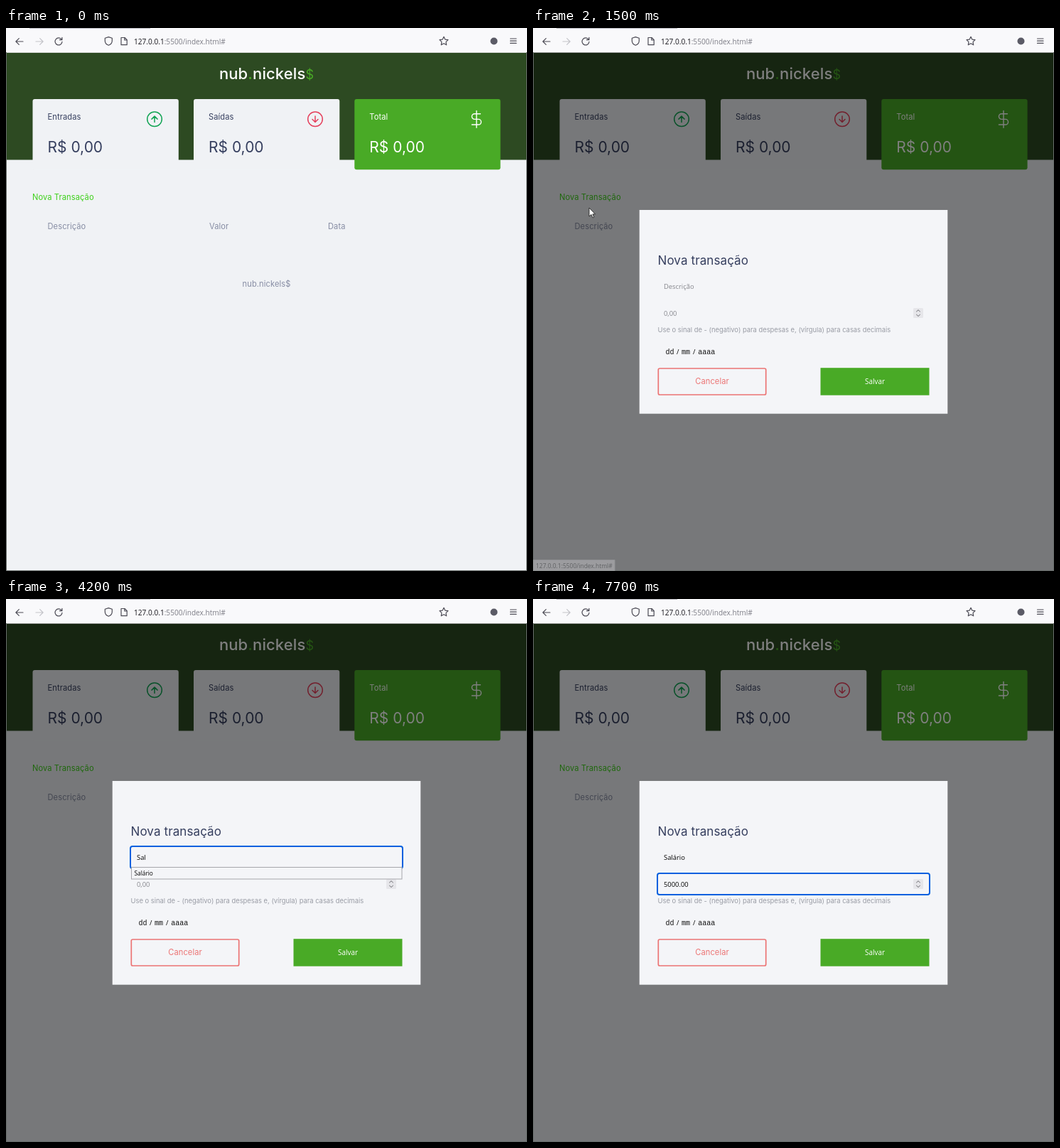
An HTML page that plays this animation: 733x764 px, repeating every 8 s.

```html
<!DOCTYPE html>
<html lang="pt-BR">
<head>
<meta charset="utf-8">
<title>Nova transação</title>
<style>
html, body { margin: 0; width: 100%; height: 100%; overflow: hidden; background: #f0f2f5; }
svg { display: block; width: 733px; height: 764px; }
text { font: 11.1px Inter, "Open Sans", sans-serif; letter-spacing: .1px; fill: #363f5f; white-space: pre; }
.ui { font: 9.4px "Open Sans", "Noto Sans", sans-serif; letter-spacing: 0; fill: #000; }
.mono { font: 10px "Liberation Mono", "Courier New", monospace; letter-spacing: 0; fill: #111; }
.url { font-size: 10.1px; fill: #15141a; }
.money { font-size: 21px; letter-spacing: 0; }
.muted { fill: #868ca3; }
.hint { font-size: 9.4px; fill: #999ca5; letter-spacing: 0; }
.hollow { fill: #85868c; }
.white { fill: #fff; }
.mid { text-anchor: middle; }
.line { fill: none; stroke-linecap: round; stroke-linejoin: round; }
.icon { stroke: #4c4b55; stroke-width: 1.2; }
.hide { display: none; }
</style>
</head>
<body>
<svg viewBox="0 0 733 764" xmlns="http://www.w3.org/2000/svg">
  <rect width="733" height="764" fill="#f0f2f5"/>

  <!-- browser toolbar -->
  <rect width="733" height="34" fill="#f9f9fb"/>
  <rect x="33" width="170" height="1" fill="#b9b9bf"/>
  <rect y="34" width="733" height="1" fill="#d5d8d6"/>
  <g class="line icon">
    <path d="M24 19H14M18.3 14.6L13.9 19l4.4 4.4"/>
    <path d="M42 19h10M47.700 14.600L52.100 19l-4.400 4.400" stroke="#c3c3c8"/>
    <path d="M78.200 16.200A5 5 0 1 0 79 19.300M78.900 13.300v3.400h-3.400"/>
    <path d="M144.300 12.600l5 1.700v3.600c0 3-2.200 5.300-5 6.400c-2.800-1.100-5-3.400-5-6.400v-3.600z"/>
    <path d="M162 13.500h5l3.200 3.200v7H162zM166.800 13.700v3.300h3.200"/>
    <path d="M616 12.300l1.800 3.800 4.200.6-3 3 .7 4.100-3.700-2-3.700 2 .7-4.100-3-3 4.200-.6z"/>
    <path d="M709.500 15h8.500M709.500 18.200h8.500M709.500 21.400h8.500"/>
  </g>
  <circle cx="686.500" cy="18.500" r="5" fill="#5b5b66"/>
  <text class="ui url" x="180" y="22.700">127.0.0.1<tspan fill="#7c7c85">:5500/index.html#</tspan></text>

  <!-- page -->
  <rect y="35" width="733" height="150.500" fill="#2d4a22"/>
  <text class="mid" x="366.500" y="72" style="font-size:22px;font-weight:500;fill:#fff">nub<tspan fill="#49aa26">.</tspan>nickels<tspan fill="#49aa26" font-weight="400" style="font-size:18px">$</tspan></text>
  <g id="cards"></g>
  <g class="line" stroke-width="1.500">
    <g stroke="#12a454"><circle cx="209" cy="128.300" r="10.300"/><path d="M209 132.500v-8.400M205 128.100l4-4 4 4"/></g>
    <g stroke="#e5405c"><circle cx="435" cy="128.300" r="10.300"/><path d="M435 124.100v8.400M431 128.500l4 4 4-4"/></g>
    <path stroke="#fff" stroke-width="1.300" transform="translate(648.900 115.300) scale(1.090)" d="M12 1v22M17 5H9.500a3.500 3.500 0 0 0 0 7h5a3.500 3.500 0 0 1 0 7H6"/>
  </g>
  <text id="link" x="37" y="241.500">Nova Transação</text>
  <text class="muted" x="58.500" y="283">Descrição</text>
  <text class="muted" x="286" y="283">Valor</text>
  <text class="muted" x="453" y="283">Data</text>
  <text class="muted mid" x="366.500" y="364">nub.nickels$</text>

  <!-- dialog -->
  <g id="modal">
    <rect y="34.500" width="733" height="730" opacity=".5"/>
    <rect x="149.700" y="256" width="433.600" height="286.700" fill="#f4f5f8"/>
    <text x="175.500" y="333" style="font-size:17px">Nova transação</text>
    <text id="desc" class="ui" x="184" y="367"></text>
    <text id="val" class="ui" x="184" y="405"></text>
    <rect x="535" y="394" width="14" height="14" rx="1.500" fill="#e6e6ea"/>
    <path class="line" stroke="#6a6a70" d="M539.500 399l2.500-2.300 2.500 2.300M539.500 403.200l2.500 2.300 2.500-2.300"/>
    <text class="hint" x="175.500" y="428">Use o sinal de - (negativo) para despesas e, (vírgula) para casas decimais</text>
    <text class="mono" x="186.500" y="459">dd</text>
    <text class="ui" x="202" y="459">/</text>
    <text class="mono" x="209" y="459">mm</text>
    <text class="ui" x="225" y="459">/</text>
    <text class="mono" x="232.300" y="459">aaaa</text>
    <rect x="176.300" y="479" width="151.400" height="37" rx="2" fill="none" stroke="#ec7474" stroke-width="1.700"/>
    <text class="mid" x="252" y="501.300" style="fill:#ec7474">Cancelar</text>
    <rect x="404.500" y="478.200" width="153" height="38.500" fill="#49aa26"/>
    <text class="ui mid white" x="481" y="501" style="font-size:9.900px">Salvar</text>
    <rect id="ring" x="175" width="383" rx="3" fill="none" stroke="#0060df" stroke-width="2"/>
    <rect id="caret" width="1" height="12"/>
    <g id="list">
      <rect x="176.500" y="377.500" width="380.500" height="16.500" fill="#f4f5f8" stroke="#a6a6ab"/>
      <rect id="pick" x="177" y="378" width="379.500" height="15.500" fill="#0078d7"/>
      <text id="option" class="ui" x="180.500" y="389.300" style="font-size:8.300px">Salário</text>
    </g>
  </g>

  <!-- window edge and status bar -->
  <path d="M.5 34V764M732.500 34V764M0 763.500H733" stroke="#666b69" fill="none"/>
  <g id="status">
    <path d="M0 748.500H115V764H0Z" fill="#f1f1f5" stroke="#d2d2d6"/>
    <text class="ui" x="4" y="759.500" style="font-size:8.450px;fill:#2a2a30">127.0.0.1:5500/index.html#</text>
  </g>

  <path id="arrow" fill="#fff" stroke="#222" stroke-width=".900" d="M0 0V12L3 9.500 5 14 6.800 13.200 4.900 8.900H8.500Z"/>
  <path id="hand" fill="#fff" stroke="#222" stroke-width="1" stroke-linejoin="round" transform="translate(76 232)"
    d="M3.500 9.600V2a1.300 1.300 0 0 1 2.600 0V6.800a1.200 1.200 0 0 1 2.400.2a1.200 1.200 0 0 1 2.300.5a1.100 1.100 0 0 1 2.200.6V12c0 2-1.200 3-1.400 5.600H5C4.500 15 1.500 12.500.6 10.600C.2 9.400 1.600 8.600 2.400 9.600Z"/>
</svg>
<script>
const LOOP = 8000;
const el = {};
document.querySelectorAll('[id]').forEach(n => el[n.id] = n);

const cards = [[37.5, 'Entradas'], [264, 'Saídas'], [490.3, 'Total']];
el.cards.innerHTML = cards.map(([x, label], i) => {
  const tone = i === 2 ? ' white' : '';
  return `<rect x="${x}" y="100" width="205.300" height="99.300" rx="3" fill="${i === 2 ? '#49aa26' : '#f0f2f5'}"/>
    <text class="${tone}" x="${x + 21}" y="129">${label}</text>
    <text class="money${tone}" x="${x + 21}" y="175">R$ 0,00</text>`;
}).join('');

// Each row: start time, then the value held until the next row.
const pointer = [
  [0, null], [100, [576, 1]], [200, [470, 82]], [300, [330, 176]], [400, [190, 254]],
  [500, [80, 294]], [600, [24, 288]], [700, [13, 266]], [800, [48, 246]], [900, [79, 234]],
  [1000, null], [1500, [79, 253]], [1600, [98, 272]], [1700, [142, 306]], [1800, [186, 340]], [1900, null]
];
const desc = [[0, ''], [3300, 'S'], [3700, 'Sa'], [4000, 'Sal'], [4800, 'Salário']];
const value = [
  [0, ''], [6000, '5'], [6200, '50'], [6500, '500'], [6600, '5000'],
  [7000, '5000.'], [7200, '5000.0'], [7400, '5000.00']
];
const caret = [
  [0, false], [2600, true], [3100, false], [3300, true], [4200, false],
  [4700, true], [4800, false], [5600, true], [7700, false]
];
const status = [[0, 0], [1200, .5], [1300, 1], [1500, .3], [1600, 0]];

const at = (steps, t) => steps.filter(s => s[0] <= t).pop()[1];
const within = (t, a, b) => t >= a && t < b;
const show = (node, on) => node.classList.toggle('hide', !on);

function fill(node, text, placeholder) {
  const shown = text || placeholder;
  if (node.textContent !== shown) node.textContent = shown;
  node.classList.toggle('hollow', !text);
}

function render(t) {
  const second = t >= 5600;
  const picked = t >= 4800;
  const typed = at(second ? value : desc, t);

  el.link.style.fill = within(t, 900, 1500) ? '#26331f' : '#3dd01a';
  show(el.modal, t >= 1500);
  fill(el.desc, at(desc, t), 'Descrição');
  fill(el.val, at(value, t), '0,00');

  show(el.ring, t >= 2600);
  el.ring.setAttribute('y', second ? 386 : 348);
  el.ring.setAttribute('height', second ? 30 : 31);

  const caretOn = at(caret, t);
  show(el.caret, caretOn);
  if (caretOn) {
    const width = typed ? (second ? el.val : el.desc).getComputedTextLength() : 0;
    el.caret.setAttribute('x', Math.round(184 + width));
    el.caret.setAttribute('y', second ? 395 : 357);
  }

  show(el.list, within(t, 3400, 5200));
  show(el.pick, picked);
  el.option.style.fill = picked ? '#fff' : '#000';

  el.status.setAttribute('opacity', at(status, t));
  const p = at(pointer, t);
  show(el.arrow, p);
  if (p) el.arrow.setAttribute('transform', `translate(${p})`);
  show(el.hand, within(t, 1000, 1500));
}

function tick(now) {
  render(now % LOOP);
  requestAnimationFrame(tick);
}
render(0);
requestAnimationFrame(tick);
</script>
</body>
</html>
```
